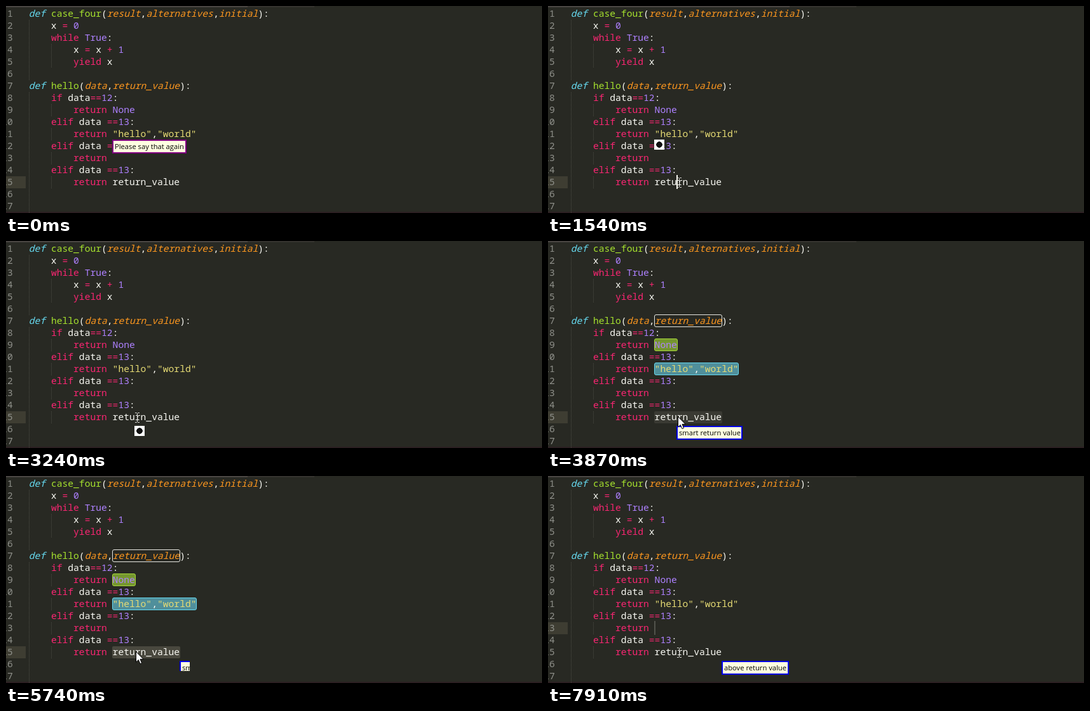
These frames come from a looping animation (843 by 327 pixels, 8 s). An HTML page:

```html
<!DOCTYPE html>
<html lang="en">
<head>
<meta charset="utf-8">
<title>Editing by voice</title>
<style>
  html, body { margin: 0; width: 100%; height: 100%; overflow: hidden; background: #282923; }
  #stage { position: relative; width: 843px; height: 327px; overflow: hidden; background: #282923; }
  #stage > * { position: absolute; box-sizing: border-box; }

  /* every change is a hard cut on one 8 s clock */
  .anim { animation: 8s step-end infinite; }

  .bar { left: 0; top: 0; height: 2px; width: 485px; background: linear-gradient(90deg, #4a4643 380px, #35332f 380px); }
  .foot { left: 0; bottom: 0; height: 2px; width: 100%; background: #2c2022; }
  .guide { width: 1px; background: repeating-linear-gradient(#4b4c44 0 1px, transparent 1px 2px); }

  pre { margin: 0; top: 2px; font: 14.66px/19px "Noto Sans Mono", "DejaVu Sans Mono", monospace; color: #f8f8f2; }
  #nums { left: -20px; width: 30.8px; text-align: right; color: #8f908a; }
  #code { left: 35.7px; }
  #code i { color: #fd971f; }
  #code .d { color: #66d9ef; }
  #code .f { color: #a6e22e; }
  #code b { color: #f92672; font-weight: normal; }
  #code u { color: #ae81ff; text-decoration: none; }
  #code s { color: #e6db74; text-decoration: none; }

  #row { left: 0; top: 269px; width: 31px; height: 19px; background: #3e3d32; animation-name: row; }
  @keyframes row { 91%, 100% { transform: translateY(-38px); } }

  .mark { left: 167px; height: 20px; border: 1px solid; border-radius: 3px; opacity: 0; animation-name: marks; }
  @keyframes marks { 48.375% { opacity: 1; } 91%, 100% { opacity: 0; } }
  #sel { left: 167px; top: 269px; width: 107px; height: 19px; border-radius: 2px; animation-name: sel; }
  @keyframes sel {
    48.375% { background: #3a3a33; }
    50.25% { background: #49483e; }
    91%, 100% { background: transparent; }
  }

  #caret { left: 202px; top: 267px; width: 2px; height: 22px; background: #f8f8f0; opacity: 0; animation-name: blink, place; }
  @keyframes place {
    50.25% { transform: translateX(71px); }
    91%, 100% { transform: translate(-35px, -38px); }
  }
  @keyframes blink {
    15.25% { opacity: 1; }
    22.25% { opacity: .75; }
    23.25% { opacity: .4; }
    24.25% { opacity: .1; }
    25.25% { opacity: 0; }
    28.875% { opacity: .3; }
    29.875% { opacity: .7; }
    31% { opacity: 1; }
    34.75% { opacity: .75; }
    35.75% { opacity: .45; }
    36.625% { opacity: .15; }
    37.625% { opacity: 0; }
    40.625% { opacity: .2; }
    41.625% { opacity: .5; }
    42.625% { opacity: .8; }
    43.625% { opacity: 1; }
    48.375% { opacity: 0; }
    50.25% { opacity: 1; }
    54.125% { opacity: .75; }
    55.125% { opacity: .45; }
    56.125% { opacity: .15; }
    57.125% { opacity: 0; }
    62.875% { opacity: .4; }
    63.875% { opacity: .8; }
    65.75% { opacity: 1; }
    67.875% { opacity: .75; }
    68.875% { opacity: .45; }
    69.75% { opacity: .2; }
    70.75% { opacity: 0; }
    75.5% { opacity: .5; }
    76.5% { opacity: 1; }
    79.625% { opacity: .75; }
    80.875% { opacity: .45; }
    82.125% { opacity: .15; }
    83.375% { opacity: 0; }
    91% { opacity: 1; }
    97.875% { opacity: .6; }
    98.875%, 100% { opacity: .2; }
  }

  .tip {
    left: 202px; top: 292px; height: 22px; padding-left: 2px; border: 2px solid #0000e8;
    background: #ffffe1; color: #000; white-space: nowrap; overflow: hidden;
    font: 11.2px/18px "Open Sans", "Noto Sans", sans-serif;
  }
  #again { width: 117px; border-color: #800080; animation-name: again; }
  @keyframes again {
    0% { transform: translate(-35px, -81px); clip-path: inset(0); }
    15.25% { transform: translate(-35px, -81px); clip-path: inset(0 60px 3px 0); }
    16.25% { transform: translate(-35px, -81px); clip-path: inset(0 101px 6px 0); }
    19.25% { transform: none; clip-path: inset(0 100% 0 0); }
    21.25% { clip-path: inset(0); }
    23.25% { clip-path: inset(0 50px 3px 0); }
    24.25% { clip-path: inset(0 101px 6px 0); }
    25.25%, 100% { transform: none; clip-path: inset(0 100% 0 0); }
  }
  #smart { width: 104px; animation-name: smart; }
  @keyframes smart {
    0% { transform: none; clip-path: inset(0 100% 0 0); }
    45.5% { transform: none; clip-path: inset(0 50px 0 0); }
    46.5% { transform: none; clip-path: inset(0); }
    67.875% { transform: translateX(71px); clip-path: inset(0); }
    69.75% { transform: translateX(71px); clip-path: inset(0 30px 2px 0); }
    70.75% { transform: translateX(71px); clip-path: inset(0 60px 4px 0); }
    71.75% { transform: translateX(71px); clip-path: inset(0 88px 6px 0); }
    72.625%, 100% { transform: none; clip-path: inset(0 100% 0 0); }
  }
  #above { left: 273px; width: 106px; animation-name: above; }
  @keyframes above {
    0% { clip-path: inset(0 100% 0 0); }
    89.125% { clip-path: inset(0 50px 0 0); }
    90.125%, 100% { clip-path: inset(0); }
  }

  /* the tip folded away */
  #badge {
    left: 202px; top: 292px; width: 16px; height: 16px; opacity: 0; animation-name: badge;
    background: radial-gradient(circle at 50% 50%, #111 4.5px, #fff 5px);
  }
  @keyframes badge {
    19.25% { opacity: 1; transform: translate(-35px, -81px); }
    21.25% { opacity: 0; transform: none; }
    25.25% { opacity: 1; transform: none; }
    45.5% { opacity: 0; transform: none; }
    72.625% { opacity: 1; transform: translateX(71px); }
    89.125%, 100% { opacity: 0; transform: none; }
  }

  #beam { left: 202px; top: 271px; opacity: 0; animation-name: beam; }
  @keyframes beam {
    5.375% { opacity: 1; transform: translate(462px, 39px); }
    6% { opacity: 1; transform: translate(270px, -8px); }
    6.625% { opacity: 1; transform: translate(102px, -51px); }
    10.5% { opacity: 1; transform: translate(84px, -38px); }
    11.625% { opacity: 1; transform: translate(34px, -10px); }
    12.625% { opacity: 1; transform: none; }
    48.375% { opacity: 0; transform: none; }
    92%, 100% { opacity: 1; transform: none; }
  }
  #arrow { left: 204px; top: 277px; opacity: 0; animation-name: arrow; }
  @keyframes arrow { 48.375% { opacity: 1; } 92%, 100% { opacity: 0; } }
</style>
</head>
<body>
<div id="stage">
  <div class="bar"></div>
  <div class="foot"></div>
  <div id="row" class="anim"></div>

  <div class="guide" style="left:36px;top:22px;height:95px"></div>
  <div class="guide" style="left:36px;top:136px;height:191px"></div>
  <div class="guide" style="left:71px;top:60px;height:38px"></div>
  <div class="guide" style="left:71px;top:155px;height:19px"></div>
  <div class="guide" style="left:71px;top:193px;height:19px"></div>
  <div class="guide" style="left:71px;top:231px;height:19px"></div>
  <div class="guide" style="left:71px;top:269px;height:19px"></div>

  <div class="mark anim" style="top:116px;width:107px;border-color:#e8e8e2"></div>
  <div class="mark anim" style="top:154px;width:37px;background:#75962f;border-color:#a6d83a"></div>
  <div class="mark anim" style="top:192px;width:133px;background:#508f9b;border-color:#66d9ef"></div>
  <div id="sel" class="anim"></div>

  <pre id="nums">1
2
3
4
5
6
7
8
9
10
11
12
13
14
15
16
17</pre>
  <pre id="code"><i class="d">def</i> <span class="f">case_four</span>(<i>result</i>,<i>alternatives</i>,<i>initial</i>):
    x <b>=</b> <u>0</u>
    <b>while</b> <u>True</u>:
        x <b>=</b> x <b>+</b> <u>1</u>
        <b>yield</b> x

<i class="d">def</i> <span class="f">hello</span>(<i>data</i>,<i>return_value</i>):
    <b>if</b> data<b>==</b><u>12</u>:
        <b>return</b> <u>None</u>
    <b>elif</b> data <b>==</b><u>13</u>:
        <b>return</b> <s>"hello"</s>,<s>"world"</s>
    <b>elif</b> data <b>==</b><u>13</u>:
        <b>return</b>
    <b>elif</b> data <b>==</b><u>13</u>:
        <b>return</b> return_value</pre>

  <div id="caret" class="anim"></div>
  <div id="again" class="tip anim">Please say that again</div>
  <div id="smart" class="tip anim">smart return value</div>
  <div id="above" class="tip anim">above return value</div>
  <div id="badge" class="anim"></div>

  <svg id="beam" class="anim" width="9" height="16">
    <path d="M1 .5H3.5L4.5 1.5L5.5 .5H8M4.5 1.5V14.5M1 15.5H3.5L4.5 14.5L5.5 15.5H8" fill="none" stroke="#dcdcd8"/>
  </svg>
  <svg id="arrow" class="anim" width="13" height="21">
    <path d="M.5 .5V17L4.3 13.4L7 19.6L9.6 18.5L7 12.4H12Z" fill="#fff" stroke="#000"/>
  </svg>
</div>
</body>
</html>
```
